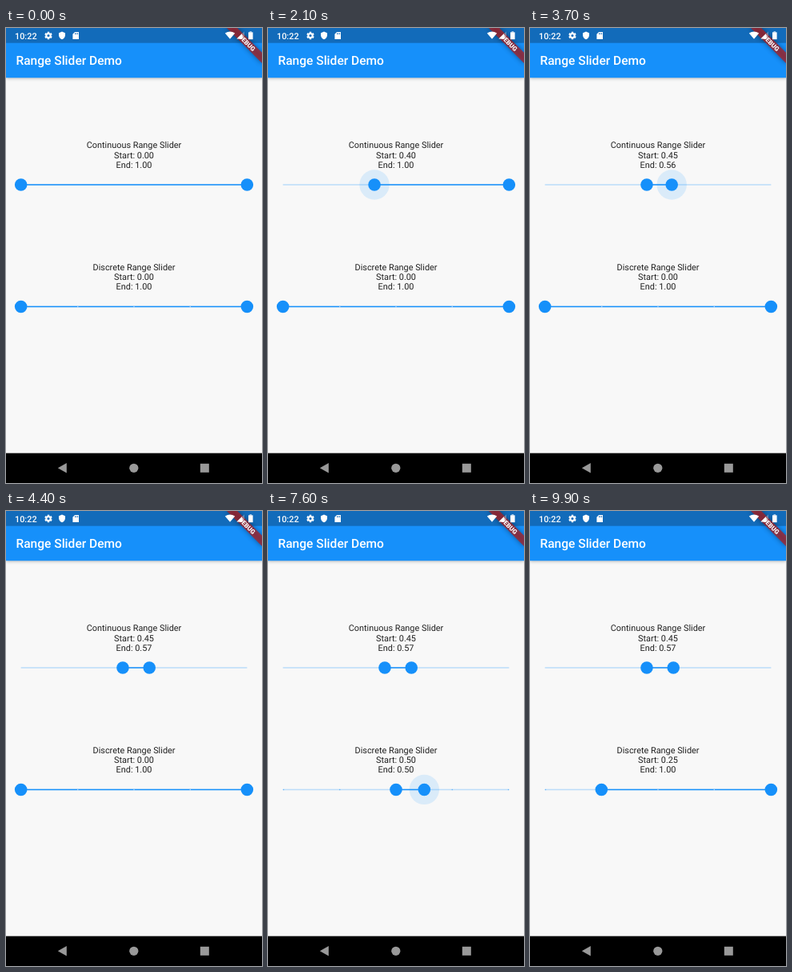
Write an HTML page with a canvas that moves like this. It is 320 px wide and 569 px high and loops after 10 s.

```html
<!DOCTYPE html>
<html lang="en">
<head>
<meta charset="utf-8">
<title>Range Slider Demo</title>
<style>
  html, body { margin: 0; width: 100%; height: 100%; overflow: hidden; background: #f8f8f8; }
  canvas { display: block; width: 320px; height: 569px; }
</style>
</head>
<body>
<canvas id="stage"></canvas>
<script>
const W = 320, H = 569, LOOP = 10000, STEP = 100;
const DP = W / 411.43;
const BLUE = '#1690fa', STATUS_BLUE = '#126bba', PAPER = '#f8f8f8', INK = '#212121';
const TRACK = { left: 24 * DP, width: W - 48 * DP, height: 2 * DP };
const THUMB_R = 10 * DP, HALO_R = 24 * DP;
const HALO_IN = 80, HALO_OUT = 150, SNAP = 150;

const canvas = document.getElementById('stage');
const ctx = canvas.getContext('2d');
const ratio = window.devicePixelRatio || 1;
canvas.width = Math.round(W * ratio);
canvas.height = Math.round(H * ratio);

// A drag lasts from finger down to finger up; its moves are glides to a value.
const move = (at, to, ms = SNAP) => ({ at, to, ms });
const drag = (down, up, ...moves) => ({ down, up, moves });

const sliders = [
  {
    title: 'Continuous Range Slider', top: 180 * DP,
    start: { home: 0, drags: [drag(1450, 2350, move(1450, .4504, 810))] },
    end: { home: 1, drags: [drag(3010, 4250, move(3010, .537, 800), move(3900, .568, 250))] }
  },
  {
    title: 'Discrete Range Slider', top: 376 * DP, divisions: 4,
    start: {
      home: 0,
      drags: [drag(5150, 6250, move(5350, .25), move(5900, .5)), drag(8350, 8850, move(8550, .25))]
    },
    end: {
      home: 1,
      drags: [drag(6920, 7950, move(7050, .75), move(7525, .5)),
              drag(9320, 9750, move(9450, .75), move(9550, 1))]
    }
  }
];

const clamp = u => Math.min(1, Math.max(0, u));
const smooth = u => u * u * (3 - 2 * u);

function thumbAt({ home, drags }, t) {
  let value = home, target = home, halo = 0;
  for (const { down, up, moves } of drags) {
    halo += clamp((t - down) / HALO_IN) - clamp((t - up) / HALO_OUT);
    for (const { at, to, ms } of moves) {
      if (t < at) continue;
      value = target + (to - target) * smooth(clamp((t - at) / ms));
      target = to;
    }
  }
  return { value, target, halo, x: TRACK.left + value * TRACK.width };
}

function withAlpha(alpha, draw) {
  ctx.save();
  ctx.globalAlpha = alpha;
  draw();
  ctx.restore();
}

function rect(x, y, w, h, color) {
  ctx.fillStyle = color;
  ctx.fillRect(x, y, w, h);
}

function disc(x, y, r, color) {
  ctx.fillStyle = color;
  ctx.beginPath();
  ctx.arc(x, y, r, 0, Math.PI * 2);
  ctx.fill();
}

function polygon(points, color) {
  ctx.fillStyle = color;
  ctx.beginPath();
  points.forEach(([x, y]) => ctx.lineTo(x, y));
  ctx.closePath();
  ctx.fill();
}

function text(str, x, y, size, color, weight = 400, align = 'left') {
  ctx.font = `${weight} ${size}px Roboto, sans-serif`;
  ctx.textRendering = 'geometricPrecision';
  ctx.textAlign = align;
  ctx.fillStyle = color;
  ctx.fillText(str, x, y);
}

function drawSlider({ title, top, divisions, start, end }, t) {
  const a = thumbAt(start, t), b = thumbAt(end, t);
  const thumbs = [a, b];
  const y = top + 72 * DP, right = TRACK.left + TRACK.width;
  const bar = (from, to) => rect(from, y - TRACK.height / 2, to - from, TRACK.height, BLUE);
  const label = thumb => (divisions ? thumb.target : thumb.value).toFixed(2);

  [title, `Start: ${label(a)}`, `End: ${label(b)}`].forEach((line, i) =>
    text(line, W / 2, top + (13 + 16 * i) * DP, 14 * DP, INK, 400, 'center'));

  withAlpha(.26, () => {
    bar(TRACK.left, a.x);
    bar(b.x, right);
  });
  bar(a.x, b.x);

  withAlpha(.13, () => thumbs.forEach(({ x, halo }) => disc(x, y, HALO_R * halo, BLUE)));

  const r = TRACK.height / 2;
  for (let i = 0; divisions && i <= divisions; i++) {
    const x = TRACK.left + r + i / divisions * (TRACK.width - 2 * r);
    const active = x > a.x && x < b.x;
    withAlpha(active ? .7 : .54, () => disc(x, y, r, active ? '#d5eafc' : BLUE));
  }
  thumbs.forEach(({ x }) => disc(x, y, THUMB_R, BLUE));
}

function drawBars() {
  ctx.save();
  ctx.shadowColor = 'rgba(0,0,0,.28)';
  ctx.shadowBlur = 4 * ratio;
  ctx.shadowOffsetY = ratio;
  rect(0, 0, W, 80 * DP, BLUE);
  ctx.restore();
  rect(0, 0, W, 24 * DP, STATUS_BLUE);
  text('Range Slider Demo', 16 * DP, 45.8, 20 * DP, '#fff', 500);

  const navTop = H - 48 * DP, grey = '#999';
  rect(0, navTop, W, H - navTop, '#000');
  polygon([[64.8, 550.3], [75.8, 544], [75.8, 556.6]], grey);
  disc(159.8, 550.3, 5.6, grey);
  rect(242.8, 544.8, 11, 11, grey);
}

function drawRibbon() {
  ctx.save();
  ctx.translate(W, 0);
  ctx.rotate(Math.PI / 4);
  ctx.save();
  ctx.shadowColor = 'rgba(0,0,0,.6)';
  ctx.shadowBlur = 6 * ratio;
  rect(-40 * DP, 28 * DP, 80 * DP, 12 * DP, 'rgba(183,28,28,.7)');
  ctx.restore();
  text('DEBUG', 0, 34 * DP + 2.8, 10.2 * DP, '#fff', 900, 'center');
  ctx.restore();
}

function drawStatus() {
  const white = '#fff';
  text('10:22', 11, 13.8, 14 * DP, white, 500);

  // gear
  ctx.save();
  ctx.translate(53, 9.5);
  disc(0, 0, 3.6, white);
  for (let i = 0; i < 6; i++) {
    rect(-1.2, -4.8, 2.4, 2.4, white);
    ctx.rotate(Math.PI / 3);
  }
  disc(0, 0, 1.6, STATUS_BLUE);
  ctx.restore();

  // shield
  ctx.fillStyle = white;
  ctx.beginPath();
  ctx.moveTo(70, 4.6);
  ctx.lineTo(74, 6.3);
  ctx.lineTo(74, 9);
  ctx.quadraticCurveTo(73.7, 12.8, 70, 14.3);
  ctx.quadraticCurveTo(66.3, 12.8, 66, 9);
  ctx.lineTo(66, 6.3);
  ctx.fill();

  // memory card
  polygon([[86, 5], [91, 5], [91, 14], [83.4, 14], [83.4, 7.7]], white);
  for (let i = 0; i < 3; i++) rect(86 + i * 1.65, 6.2, .8, 1.9, STATUS_BLUE);

  // wifi, signal, battery
  ctx.fillStyle = white;
  ctx.beginPath();
  ctx.moveTo(280, 13.8);
  ctx.lineTo(273.8, 6.4);
  ctx.quadraticCurveTo(280, 2.4, 286.2, 6.4);
  ctx.fill();
  withAlpha(.3, () => polygon([[298, 4.2], [298, 13.6], [288.4, 13.6]], white));
  polygon([[295, 7.1], [295, 13.6], [288.4, 13.6]], white);
  rect(303, 5.3, 5.6, 8.9, white);
  rect(304.5, 4.4, 2.6, 1, white);
}

function render(now) {
  const t = Math.floor(now % LOOP / STEP) * STEP;
  ctx.setTransform(ratio, 0, 0, ratio, 0, 0);
  rect(0, 0, W, H, PAPER);
  sliders.forEach(slider => drawSlider(slider, t));
  drawBars();
  drawRibbon();
  drawStatus();
}

let origin;
function frame(now) {
  origin ??= now;
  render(Math.max(0, now - origin));
  requestAnimationFrame(frame);
}
render(0);
requestAnimationFrame(frame);
</script>
</body>
</html>
```
